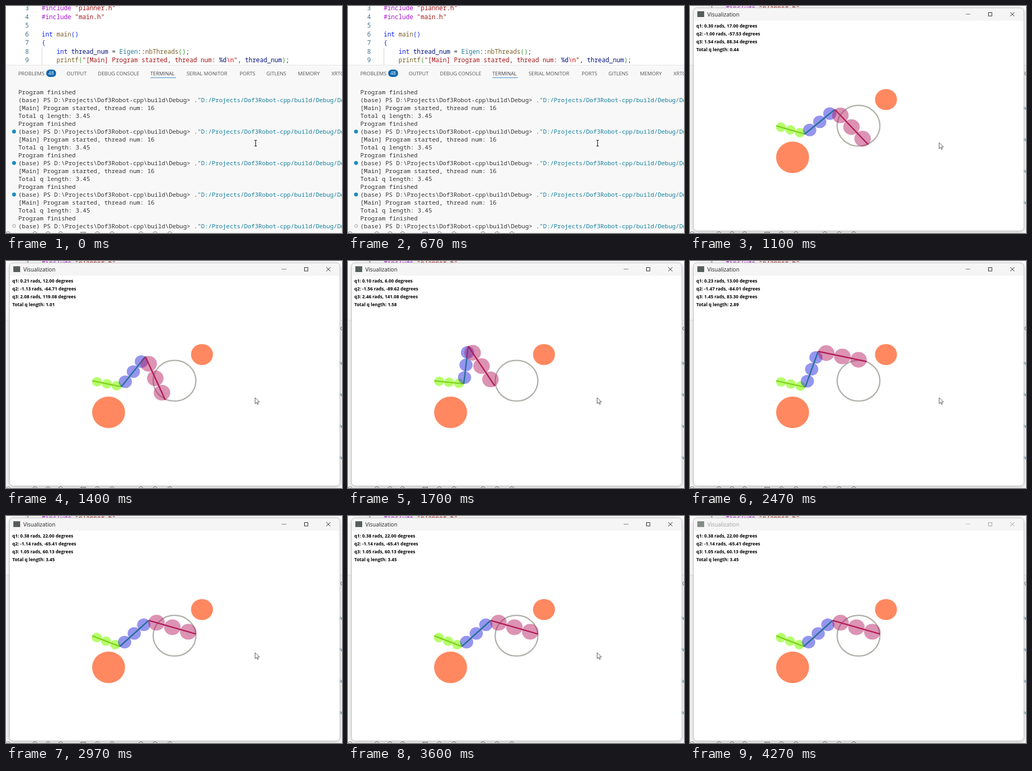
Write an HTML page with a canvas that moves like this. It is 640 by 432 pixels and loops after 4.31 s.

```html
<!DOCTYPE html>
<html lang="en">
<head>
<meta charset="utf-8">
<title>Arm planner</title>
<style>
html, body { margin: 0; width: 100%; height: 100%; overflow: hidden; background: #f8f8f8; }
canvas { display: block; width: 640px; height: 432px; }
</style>
</head>
<body>
<canvas id="stage" width="640" height="432"></canvas>
<script>
const ctx = document.getElementById('stage').getContext('2d');
const LOOP = 4310, OPEN = 700, CLOSING = 4230;
const MONO = '"Noto Sans Mono", "DejaVu Sans Mono", monospace';
const UI = '"Open Sans", "Noto Sans", sans-serif';
const RAD = Math.PI / 180;

function text(str, x, y, font, color, align = 'left') {
  ctx.font = font;
  ctx.fillStyle = color;
  ctx.textAlign = align;
  ctx.fillText(str, x, y);
}

function line(points, color, width) {
  ctx.beginPath();
  points.forEach(([x, y]) => ctx.lineTo(x, y));
  ctx.strokeStyle = color;
  ctx.lineWidth = width;
  ctx.stroke();
}

function oval(x, y, rx, ry, fill, stroke, width = 1) {
  ctx.beginPath();
  ctx.ellipse(x, y, rx, ry, 0, 0, 2 * Math.PI);
  if (fill) { ctx.fillStyle = fill; ctx.fill(); }
  if (stroke) { ctx.strokeStyle = stroke; ctx.lineWidth = width; ctx.stroke(); }
}

// ---- code editor ----
const INK = '#333', KEY = '#a814d0', STR = '#a31515', TYPE = '#0a1ef0', FUNC = '#795e26',
      VAR = '#001080', CLASS = '#267f99', OUTER = '#0431fa', INNER = '#319331';
const CODE = [
  [['#include ', KEY], ['"planner.h"', STR]],
  [['#include ', KEY], ['"main.h"', STR]],
  [],
  [['int', TYPE], [' main', FUNC], ['()', OUTER]],
  [['{', OUTER]],
  [['    int', TYPE], [' thread_num', VAR], [' = ', INK], ['Eigen', CLASS], ['::', INK],
   ['nbThreads', FUNC], ['()', INNER], [';', INK]],
  [['    printf', FUNC], ['(', INNER], ['"[Main] Program started, thread num: ', STR], ['%d', VAR],
   ['\\n', '#e00000'], ['"', STR], [', ', INK], ['thread_num', VAR], [')', INNER], [';', INK]]
];

function drawEditor() {
  const font = '11.74px ' + MONO;
  ctx.fillStyle = '#fff';
  ctx.fillRect(0, 0, 640, 112);
  CODE.forEach((parts, i) => {
    const y = 8 + i * 16.57;
    text(i + 3, 43.5, y, font, '#3a7088', 'right');
    let x = 68;
    for (const [str, color] of parts) {
      text(str, x, y, font, color);
      x += ctx.measureText(str).width;
    }
  });
  line([[68.5, 79], [68.5, 112]], '#d4d4d4', 1);
  line([[0, 112.5], [640, 112.5]], '#e5e5e5', 1);
}

// ---- panel ----
const TABS = [['PROBLEMS', 23.5], ['OUTPUT', 115.5], ['DEBUG CONSOLE', 175], ['TERMINAL', 275],
  ['SERIAL MONITOR', 344], ['PORTS', 445], ['GITLENS', 496], ['MEMORY', 556], ['XRTOS', 620]];
const PROMPT = '(base) PS D:\\Projects\\Dof3Robot-cpp\\build\\Debug> .';
const COMMAND = '"D:/Projects/Dof3Robot-cpp/build/Debug/Dof3Robot.exe"';
const OUTPUT = ['Program finished', PROMPT, '[Main] Program started, thread num: 16', 'Total q length: 3.45'];

function drawPanel(scroll) {
  for (const [name, x] of TABS) {
    text(name, x, 131.7, '9.65px ' + UI, name === 'TERMINAL' ? '#444' : '#555');
  }
  line([[275, 136.5], [324, 136.5]], '#4a8ac0', 1);
  ctx.fillStyle = '#0d68b0';
  ctx.beginPath();
  ctx.roundRect(76.5, 121, 19, 14, 7);
  ctx.fill();
  text('48', 86, 131.3, '9px ' + UI, '#fff', 'center');

  const font = '11.38px ' + MONO;
  for (let i = scroll; i < Math.min(20, scroll + 18); i++) {
    const y = 168 + (i - scroll) * 14.98;
    const str = OUTPUT[i % 4];
    text(str, 23.5, y, font, '#333');
    if (str !== PROMPT) continue;
    text(COMMAND, 23.5 + ctx.measureText(PROMPT).width, y, font, '#157f9c');
    if (i === 17) oval(15.5, y - 4, 2.8, 2.8, null, '#909090');
    else if (i > 1) oval(15.3, y - 4, 3.7, 3.7, '#1c8cc0');
  }

  // tops of the status bar icons
  for (const x of [4, 55, 80, 104, 174, 202, 257, 284, 312]) {
    ctx.beginPath();
    ctx.arc(x, 434, 4.5, Math.PI, 2 * Math.PI);
    ctx.strokeStyle = '#707070';
    ctx.lineWidth = 1;
    ctx.stroke();
  }
  ctx.strokeRect(142.5, 430.5, 9, 6);
}

// ---- arm ----
const LEN = [0.6, 0.8, 1];
const SX = 94.5, SY = 90, BASE = [164.2, 228], MID = 1.66;
const LOOKS = [
  ['rgba(125,255,0,.58)', '#84cf20', 9.5],
  ['rgba(20,20,220,.45)', '#236f96', 12.6],
  ['rgba(180,25,95,.47)', '#b01c54', 15.7]
];

function joints(q) {
  let a = 0, x = 0, y = 0;
  return [[0, 0], ...LEN.map((len, i) => {
    a += q[i] * RAD;
    return [x += len * Math.cos(a), y += len * Math.sin(a)];
  })];
}

// tick, joint angles in degrees, travelled length
const KEYS = [
  [0, [17, -59.5, 64.2], 0],
  [12, [17, -57.53, 88.34], 0.44],
  [30, [6, -89.62, 141.08], 1.58],
  [53, [13, -84.01, 83.3], 2.89],
  [65, [22, -65.41, 60.13], 3.45]
].map(([tick, q, total]) => {
  const [x, y] = joints(q)[3];
  const turn = (Math.atan2(y, x - MID) + 2 * Math.PI) % (2 * Math.PI);
  return { tick, q1: q[0], total, turn, r: Math.hypot(x - MID, y) };
});

function poseAt(tick) {
  tick = Math.max(0, Math.min(65, tick));
  const n = Math.max(1, KEYS.findIndex(k => k.tick >= tick));
  const a = KEYS[n - 1], b = KEYS[n];
  const f = (tick - a.tick) / (b.tick - a.tick);
  const mix = name => a[name] + (b[name] - a[name]) * f;

  // the first joint moves in whole degrees, the other two reach for the ring
  const q1 = Math.round(mix('q1')), turn = mix('turn'), r = mix('r');
  const dx = MID + r * Math.cos(turn) - LEN[0] * Math.cos(q1 * RAD);
  const dy = r * Math.sin(turn) - LEN[0] * Math.sin(q1 * RAD);
  const c = (dx * dx + dy * dy - LEN[1] ** 2 - LEN[2] ** 2) / (2 * LEN[1] * LEN[2]);
  const q3 = Math.acos(Math.max(-1, Math.min(1, c)));
  const lean = Math.atan2(LEN[2] * Math.sin(q3), LEN[1] + LEN[2] * Math.cos(q3));
  const q2 = (Math.atan2(dy, dx) - lean) / RAD - q1;
  return { q: [q1, q2, q3 / RAD], total: mix('total') };
}

function drawArm(q) {
  const pts = joints(q).map(([x, y]) => [BASE[0] + x * SX, BASE[1] + y * SY]);
  LOOKS.forEach(([fill, stroke, r], i) => {
    const [a, b] = [pts[i], pts[i + 1]];
    for (const f of [1 / 6, 1 / 2, 5 / 6]) {
      oval(a[0] + (b[0] - a[0]) * f, a[1] + (b[1] - a[1]) * f, r, r * SY / SX, fill);
    }
    line([a, b], stroke, 2.5);
  });
}

// ---- window ----
function drawWindow(t) {
  const grow = Math.min(1, (t - OPEN + 30) / 130);
  const active = t < CLOSING;
  const ink = active ? '#222' : '#a0a0a0';
  const { q, total } = poseAt(Math.floor((t - OPEN) * 0.03 + 0.001));

  ctx.save();
  ctx.globalAlpha = grow;
  const s = 0.94 + 0.06 * grow;
  ctx.translate(321, 216);
  ctx.scale(s, s);
  ctx.translate(-321, -216);

  ctx.save();
  ctx.shadowColor = 'rgba(0,0,0,.22)';
  ctx.shadowBlur = 10;
  ctx.shadowOffsetY = 2;
  ctx.beginPath();
  ctx.roundRect(6.5, 3.5, 629.5, 424.5, 7);
  ctx.fillStyle = '#fff';
  ctx.fill();
  ctx.restore();

  ctx.save();
  ctx.clip();
  ctx.fillStyle = '#f5f5f5';
  ctx.fillRect(6, 3, 631, 25);
  ctx.restore();
  ctx.strokeStyle = '#c0c0c0';
  ctx.lineWidth = 1;
  ctx.stroke();

  ctx.fillStyle = active ? '#565e5c' : '#848c88';
  ctx.fillRect(14, 10, 13, 11);
  text('Visualization', 33, 20, '10.45px ' + UI, ink);
  line([[525, 15.5], [534, 15.5]], active ? '#777' : '#c0c0c0', 1);
  ctx.strokeStyle = ink;
  ctx.strokeRect(568.5, 12.5, 6.5, 6.5);
  line([[610, 12], [618, 19.5]], ink, 1);
  line([[618, 12], [610, 19.5]], ink, 1);

  const rows = q.map((deg, i) =>
    `q${i + 1}: ${(deg * RAD).toFixed(2)} rads, ${deg.toFixed(2)} degrees`);
  rows.push('Total q length: ' + total.toFixed(2));
  rows.forEach((row, i) => text(row, 12, 41.3 + i * 15, 'bold 8.65px ' + UI, '#000'));

  oval(195.4, 288, 31.4, 30, '#ff8860');
  oval(373.3, 178, 20.9, 20, '#ff8860');
  oval(321, 227.8, 40.7, 38.8, null, '#b2b2ac', 2.5);
  drawArm(q);
  ctx.restore();
}

function drawPointer(t) {
  if (t < OPEN) {
    line([[473, 255.5], [478, 255.5]], '#222', 1);
    line([[475.5, 255.5], [475.5, 266.5]], '#222', 1.2);
    line([[473, 266.5], [478, 266.5]], '#222', 1);
  } else if (t < CLOSING) {
    ctx.beginPath();
    [[474.5, 260], [474.5, 271.5], [477.2, 269], [479, 273], [480.8, 272.2], [479, 268.3], [482.8, 268.3]]
      .forEach(([x, y]) => ctx.lineTo(x, y));
    ctx.closePath();
    ctx.fillStyle = '#fff';
    ctx.fill();
    ctx.strokeStyle = '#555';
    ctx.lineWidth = 1;
    ctx.stroke();
  }
}

function draw(t) {
  ctx.fillStyle = '#f8f8f8';
  ctx.fillRect(0, 0, 640, 432);
  drawEditor();
  drawPanel(t < OPEN ? 0 : 3);
  if (t >= OPEN) drawWindow(t);
  drawPointer(t);
}

const start = performance.now();
function frame() {
  draw((performance.now() - start) % LOOP);
  requestAnimationFrame(frame);
}
frame();
</script>
</body>
</html>
```
